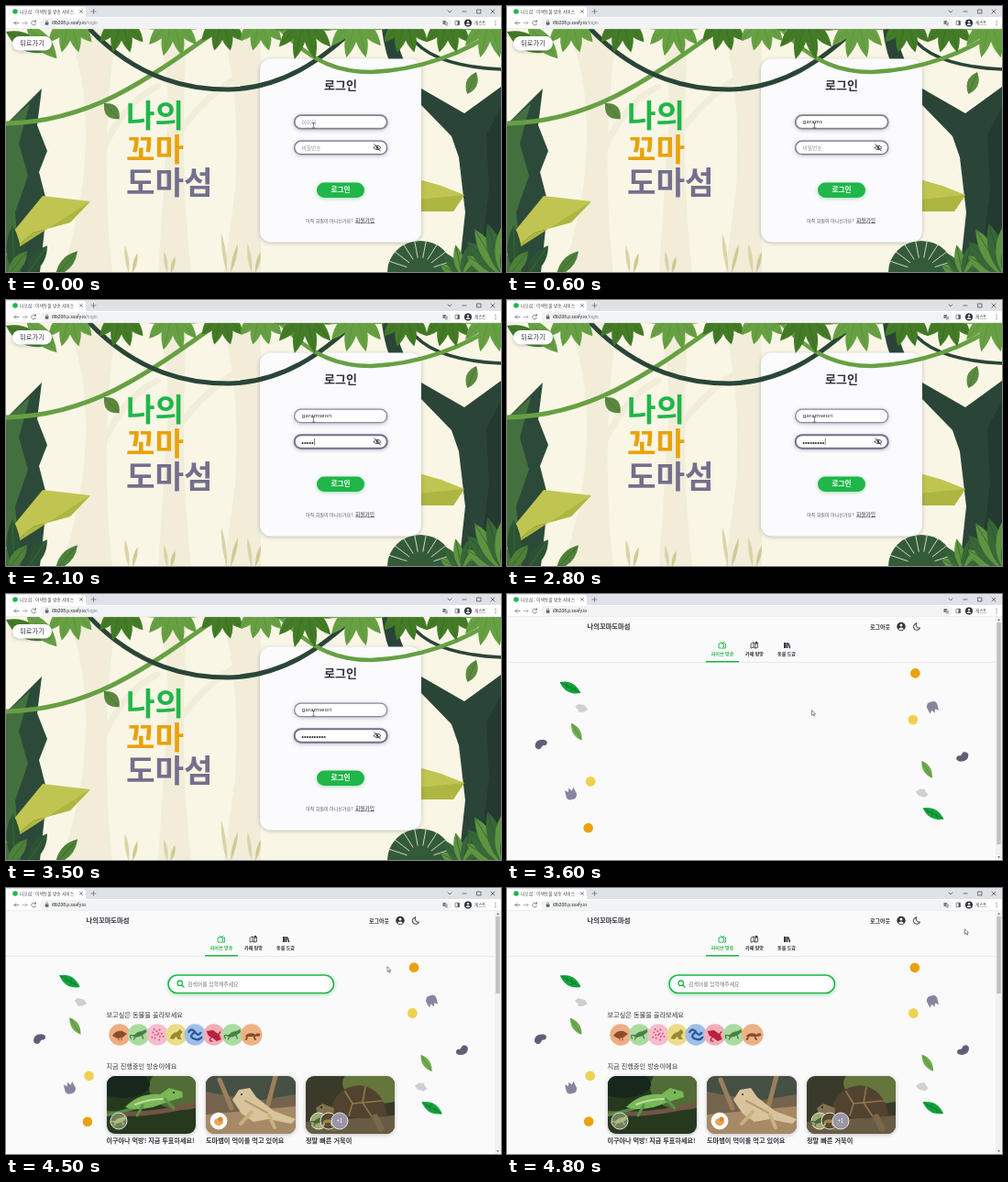
Recreate the animation shown at these times as an HTML page. Size 540 px wide and 290 px high, loop 4900 ms.

```html
<!DOCTYPE html>
<html lang="ko">
<head>
<meta charset="utf-8">
<title>나꼬섬</title>
<style>
html, body { margin: 0; width: 100%; height: 100%; overflow: hidden; background: #fff; }
svg { display: block; width: 540px; height: 290px; }
text { font-family: "Noto Sans CJK KR", "Noto Sans CJK", "Noto Sans", sans-serif; white-space: pre; }
.url { font-family: Roboto, "Open Sans", sans-serif; }
.latin { font-family: "Noto Sans", "Open Sans", sans-serif; }
.dots { font-family: "Liberation Sans", Arial, sans-serif; }
.lift { filter: drop-shadow(0 1px 2px rgba(60, 55, 80, .3)); }
.glow { filter: drop-shadow(0 1px 2px rgba(34, 179, 75, .4)); }
</style>
</head>
<body>
<svg id="stage" viewBox="0 0 540 290" xmlns="http://www.w3.org/2000/svg"></svg>
<script>
const LOOP = 4900, STEP = 100;
const GREEN = '#20b649', GOLD = '#e8a20c', PLUM = '#746f8d', INK = '#34323d';
const DARK = '#2a4538', LIGHT_LEAF = '#67a043', MID_LEAF = '#437b27';
const USER = 'garamseori';

const path = (d, fill) => `<path d="${d}" fill="${fill}"/>`;
const line = (d, color, w = 1, extra = '') =>
  `<path d="${d}" fill="none" stroke="${color}" stroke-width="${w}" stroke-linecap="round" stroke-linejoin="round" ${extra}/>`;
const dot = (x, y, r, fill, extra = '') => `<circle cx="${x}" cy="${y}" r="${r}" fill="${fill}" ${extra}/>`;
const oval = (x, y, rx, ry, fill) => `<ellipse cx="${x}" cy="${y}" rx="${rx}" ry="${ry}" fill="${fill}"/>`;
const box = (x, y, w, h, r, fill, extra = '') =>
  `<rect x="${x}" y="${y}" width="${w}" height="${h}" rx="${r}" fill="${fill}" ${extra}/>`;
const group = (content, attrs = '') => `<g ${attrs}>${content}</g>`;
const at = (x, y, content, more = '') => group(content, `transform="translate(${x} ${y}) ${more}"`);
// y is the middle of the line
const text = (x, y, size, str, fill = INK, weight = 400, extra = '') =>
  `<text x="${x}" y="${y + size * .36}" font-size="${size}" fill="${fill}" font-weight="${weight}" ${extra}>${str}</text>`;
const MID = 'text-anchor="middle"';

function leaf(x, y, len, wide, angle, fill, vein) {
  const h = len / 2;
  return at(x, y, path(`M0 0Q${h} ${-wide} ${len} 0Q${h} ${wide} 0 0Z`, fill) +
    (vein ? line(`M1 0H${len - 2}`, vein, .5) : ''), `rotate(${angle})`);
}
function fan(x, y, count, len, wide, from, to, colors, vein = '#24452e') {
  let s = '';
  for (let i = 0; i < count; i++) {
    const k = i / (count - 1);
    s += leaf(x, y, len * (.75 + .25 * Math.sin(Math.PI * k)), wide, from + (to - from) * k,
      colors[i % colors.length], vein);
  }
  return s;
}

function chrome() {
  const icon = '#5f6368';
  return box(0, 0, 540, 13, 0, '#dee1e6') +
    path('M0 13V1H84Q87 1 87 4V10Q87 13 90 13Z', '#fff') +
    dot(10, 6, 2.8, GREEN) +
    text(15, 6, 4.75, '나꼬섬 : 이색동물 방송 서비스', '#45484c') +
    line('M80.5 4.5L83.5 7.5M83.5 4.5L80.5 7.5', icon, .7) +
    line('M93 6H98M95.5 3.5V8.5', icon, .7) +
    line('M482 5L484 7L486 5M498 6H502M514 4H518V8H514ZM529 4L533 8M533 4L529 8', '#333', .65) +
    box(0, 12, 540, 13, 0, '#fff') +
    box(37, 13, 449, 11, 5.5, '#f1f3f4') +
    line('M14 18.5H9M11 16.5L9 18.5L11 20.5', icon, .7) +
    line('M18 18.5H23M21 16.5L23 18.5L21 20.5', '#9a9da1', .7) +
    line('M32.3 17A2.5 2.5 0 1 0 32.6 19.5M32.5 15.5V17.3H30.7', icon, .7) +
    box(42.8, 17.8, 3.6, 3, .5, icon) + line('M43.6 18V16.8A1 1 0 0 1 45.6 16.8V18', icon, .6) +
    text(50, 18.4, 4.9, 'i8b208.p.ssafy.io<tspan id="route" fill="#85898d">/login</tspan>', '#292b2e', 400, 'class="url"') +
    box(476.5, 16, 3.5, 4, .5, '#777b80') + box(478.8, 17.5, 3, 4, .4, '#a9adb2') +
    box(490, 16.2, 4.5, 4.5, .6, 'none', 'stroke="#555" stroke-width=".7"') + box(492.5, 16.2, 2, 4.5, 0, '#555') +
    dot(504, 18.5, 4, '#2d3136') + dot(504, 17.3, 1.2, '#dfe2e5') + path('M501.7 21A2.3 2 0 0 1 506.3 21Z', '#dfe2e5') +
    text(511, 18.4, 4.5, '게스트', '#333') +
    [16.3, 18.5, 20.7].map(y => dot(534, y, .6, icon)).join('') +
    box(0, 24.5, 540, .6, 0, '#dcdee0');
}

function jungle() {
  const pale = '#f1edd9', lime = '#c0c552', olive = '#adb641', sand = '#d9d3a6';
  let s = box(0, 25, 540, 265, 0, '#f9f6e6');
  s += path('M66 25C96 90 94 200 60 290H116C106 205 108 90 122 25Z', pale) +
    path('M164 25Q180 75 176 135L166 290H202Q188 170 198 25Z', pale) +
    path('M236 25Q256 100 250 200L238 290H278V25Z', pale) +
    line('M104 160Q128 105 165 88M180 150Q210 105 246 82', pale, 7);

  s += path('M0 129L39 90L34 130L45 158L36 181L45 216L37 290H0Z', '#2c4a39') +
    path('M0 129L26 106L14 150L24 185L10 225L16 290H0Z', '#44703f');
  // The limb passes behind the card and meets the trunk
  s += path('M410 25H424Q430 62 453 90L500 117L540 88V290H494L501 225L494 165L486 142L453 108Q416 80 410 25Z', DARK) +
    path('M540 110L524 140L527 200L516 290H540Z', '#24392f') +
    leaf(513, 72, 26, 12, 112, '#5b8a40', '#3c662c');

  s += path('M0 272L8 246L40 207L92 213L70 236L30 247Z', lime) + path('M0 272L92 213L70 236L30 247Z', olive);
  s += path('M440 186L475 196L500 206L488 224H440Z', lime) + path('M440 212L500 206L488 224H440Z', olive);

  for (const [x, h] of [[134, 30], [176, 24], [241, 44], [268, 32]]) {
    s += leaf(x, 291, h, 4, -98, sand) + leaf(x + 4, 291, h * .75, 4, -76, '#cfc993');
  }
  return s + leaf(9, 293, 54, 15, -92, '#2b5232', '#4c7a45') + leaf(22, 294, 40, 14, -55, '#2b5232', '#4c7a45') +
    leaf(2, 294, 34, 13, -52, '#4d8039', '#2b5232') + leaf(54, 294, 36, 12, -48, '#4d8039', '#2b5232');
}

function foreground() {
  const vine = '#67a043', leafy = ['#5d9440', '#376738'];
  const canopy = [[70, 40, LIGHT_LEAF], [126, 40, MID_LEAF], [236, 38, MID_LEAF], [182, 44, LIGHT_LEAF],
    [278, 38, LIGHT_LEAF], [326, 48, MID_LEAF], [436, 40, MID_LEAF], [382, 46, LIGHT_LEAF],
    [482, 40, MID_LEAF], [528, 46, LIGHT_LEAF]];
  let s = line('M437 25C450 54 490 67 542 69', DARK, 3.5) +
    line('M0 128C92 126 152 82 232 25', vine, 5) +
    line('M91 25C146 82 202 91 242 91C302 90 345 58 380 25', DARK, 5) +
    line('M299 25C336 64 366 72 398 72C450 70 500 52 538 25', vine, 4.5);
  s += leaf(0, 28, 48, 18, 28, MID_LEAF, '#2f6127') + leaf(22, 20, 50, 18, 48, LIGHT_LEAF, '#4d852e');
  for (const [x, len, color] of canopy)
    s += fan(x, 12, 6, len, 13, 158, 22, [color], color === MID_LEAF ? '#356820' : '#558d35');
  s += path('M416 290A36 34 0 0 1 488 290Z', '#345b39');
  for (let a = 200; a < 350; a += 20) {
    const c = Math.cos(a * Math.PI / 180), n = Math.sin(a * Math.PI / 180);
    s += line(`M${452 + c * 16} ${290 + n * 16}L${452 + c * 38} ${290 + n * 36}`, '#e6e5cc', .9);
  }
  return s + fan(498, 296, 6, 37, 11, -150, -30, leafy) +
    fan(543, 296, 6, 62, 17, -150, -78, leafy);
}

const field = (id, y) => box(314.7, y, 101, 14.5, 7.2, '#fff', `id="${id}" stroke="${PLUM}" class="lift"`);

function loginPage() {
  return jungle() +
    box(277, 57.5, 176, 200, 12, '#fbfafd', 'class="lift"') +
    foreground() +
    leaf(107, 106, 24, 14, 46, '#5b8740', '#3c662c') +
    box(7, 33, 43, 15.5, 7.7, '#fff', 'class="lift"') + text(28.5, 40.6, 7.3, '뒤로가기', INK, 500, MID) +
    text(131, 120, 34.3, '나의', GREEN, 700) + text(131, 156.5, 34.3, '꼬마', GOLD, 700) +
    text(131, 193, 34.3, '도마섬', PLUM, 700) +
    text(365, 86.5, 13, '로그인', INK, 700, MID) +
    field('idField', 119.2) + field('pwField', 147.2) +
    text(322.5, 126.5, 5.8, '아이디', '#9895a1', 400, 'id="idHint"') +
    text(322.5, 126.3, 6.1, '', '#2d2c33', 400, 'id="idText" class="latin"') +
    text(322.5, 154.5, 5.7, '비밀번호', '#9895a1', 400, 'id="pwHint"') +
    text(322.3, 154.8, 7.6, '', '#2d2c33', 400, 'id="pwText" class="dots"') +
    box(322, 151, .6, 7, 0, '#333', 'id="caret"') +
    line('M401 154.5Q405 149.8 409 154.5Q405 159 401 154.5M402 150.8L408.3 158', INK, .9) + dot(405, 154.5, 1.2, INK) +
    box(339, 192.5, 52, 16.5, 8.2, GREEN, 'class="glow"') + text(365, 200.7, 7.6, '로그인', '#fff', 700, MID) +
    text(327, 234, 5.05, '아직 회원이 아니신가요?', '#5d5a66') +
    text(381, 233.7, 5.7, '회원가입', INK, 500) + box(381, 236.6, 21, .5, 0, INK);
}

// Decorations of the left side; the right side is the same set turned half round
const debris = [
  [69, 102, leaf(-13, 0, 26, 10, 0, '#14a33d', '#08662a') +
    line('M-6 -2L-4 0M0 -3L2 0M5 -2L7 0M-4 2L-2 0M2 3L4 0', '#08662a', .5), 28],
  [81, 125, path('M-7 -2L-3 -5L4 -3L7 1L2 4L-3 4L-4 1Z', '#d0cfd5'), 0],
  [75.5, 150.5, leaf(-11, 0, 22, 8, 0, '#70ab50', '#457a30'), 57],
  [37, 164, path('M-7 2C-7 -4 -1 -6 4 -4C9 -2 6 3 3 2C0 1 0 5 -3 5Q-6 5 -7 2Z', '#625d76'), -12],
  [91, 204.5, dot(0, 0, 5.4, '#efd152'), 0],
  [70, 218, path('M-5 -6L-2 -3L0 -7L2 -3L5 -6L6 2Q4 7 0 6Q-6 6 -6 1Z', '#8a859e'), -20],
  [89, 254.7, dot(0, 0, 5.3, GOLD), 0]
];
const debrisSet = () => debris.map(([x, y, shape]) => at(x, y, group(shape, 'class="bit"'))).join('');

function header() {
  const tab = (x, str, color) => text(x, 65, 5.05, str, color, 700, MID);
  return text(87.5, 35.5, 7.3, '나의꼬마도마섬', INK, 700) +
    text(396, 35.6, 6, '로그아웃', INK, 700) +
    dot(430, 35.5, 4.7, INK) + dot(430, 34, 1.5, '#fff') + path('M427 38Q430 34.8 433 38Q430 40.5 427 38Z', '#fff') +
    line('M446.5 32A3.7 3.7 0 1 0 450.5 37A3.5 3.5 0 0 1 446.5 32Z', INK, 1) +
    line('M231.5 54H238.5V59H231.5ZM233 52L235 54L237 52M236.5 55V58', GREEN, .9) +
    line('M266.5 54L269 53L271 54.5L273.5 53.5V58.5L271 59L269 58L266.5 59ZM269 53V58M271 55V59', INK, .8) +
    dot(272, 53, 1.3, INK) +
    box(302, 53, 2, 6, 0, INK) + box(304.5, 53, 1.8, 6, 0, INK) + line('M307 54L308.5 58.5', INK, 1.5) +
    tab(235, '라이브 방송', GREEN) + tab(270, '카페 탐방', INK) + tab(305, '동물 도감', INK) +
    box(0, 74, 533, .6, 0, '#dedee2') + box(217, 73, 36, 1.5, 0, GREEN);
}

const lizard = (color, belly = color) =>
  line('M-8 4Q-11 -1 -5 1L4 -2M-3 1L-5 5M3 -1L5 4', color, 1.4) +
  path('M-6 2Q-2 -4 4 -4L8 -6L9 -3L5 0Q-1 4 -6 2Z', color) + line('M-3 1L5 -2', belly, .7);
const turtle = (shell, skin) =>
  path('M-7 2A7 6 0 0 1 6 2Z', shell) + oval(7, 0, 2.5, 1.8, skin) + line('M-5 3L-6 5M3 3L4 5', skin, 2);

function animals() {
  const bird = path('M-8 1Q-4 -5 3 -4L8 -1L3 3L-3 4Z', '#8c4d29') + line('M-1 3V6M2 3V6', '#8c4d29', 1);
  const gecko = [...Array(13)].map((_, i) =>
    dot((7 * Math.sin(i * 2.4) * Math.sqrt(i / 12)).toFixed(1), (7 * Math.cos(i * 2.4) * Math.sqrt(i / 12)).toFixed(1), 1, '#d55a82')).join('');
  const frog = path('M-7 4Q-5 -2 1 -3L4 -6L7 -3L4 1L6 5H2L0 2L-3 5Z', '#9a8a2f');
  const snake = line('M-7 -3Q-4 -8 0 -3Q3 2 6 -2M0 -3Q-7 1 -2 4Q4 7 7 3', '#285b9a', 2.3);
  const chameleon = path('M-8 -4L-1 -5L6 0L8 5L3 7L-2 3L-6 1Z', '#b9213e') + line('M-2 2Q-7 7 -2 7M3 2L7 -3', '#b9213e', 1.4);
  const list = [['#efad83', bird], ['#a9dca1', lizard('#4b8045')], ['#f5bdcd', gecko], ['#ecdb88', frog],
    ['#9ebfe9', snake], ['#f2aeb8', chameleon], ['#a9dca1', lizard('#4b8045')], ['#efb083', turtle('#80502f', '#80502f')]];
  return list.map(([bg, shape], i) => at(124 + i * 20.55, 160, dot(0, 0, 11.7, bg) + shape)).join('');
}

function photos() {
  const iguana = box(0, 0, 97, 63, 0, '#26391f') + oval(82, 12, 36, 25, '#536b36') + oval(17, 9, 30, 15, '#17271c') +
    line('M-2 40Q45 45 99 30', '#735444', 5) + line('M-2 43Q42 33 61 25', '#519044', 3.5) +
    path('M20 34Q35 18 58 20L68 13L82 17L83 23L70 27L50 34Q31 38 20 34Z', '#78b858') +
    line('M39 32L33 43M63 25L73 35', '#559448', 3) + line('M31 31Q46 25 61 25', '#c9d8a1', 2) + dot(73, 18, 1, '#202919');
  const dragon = box(0, 0, 98, 63, 0, '#74644d') + path('M0 0H98V20L55 27L0 17Z', '#455043') +
    path('M0 42L98 33V63H0Z', '#a58a65') + line('M15 4L28 35M76 0L66 38', '#9b7f5b', 5) +
    path('M29 26L36 15L48 13L55 23L74 38L98 47L93 52L68 47L52 50L39 41Z', '#d8c49c') +
    line('M50 39L38 52M69 43L75 56', '#c9b184', 4) + line('M43 27L67 40', '#b69c70', 2) + dot(39, 20, 1.1, '#3c3327');
  const tortoise = box(0, 0, 97, 63, 0, '#393a29') + oval(80, 8, 40, 22, '#65763d') + path('M0 50L97 43V63H0Z', '#675c43') +
    path('M27 39Q31 12 59 10Q84 13 89 43Q57 51 27 39Z', '#514330') +
    line('M43 17L51 30L47 43M65 12L62 29L72 44M51 30L62 29M83 27L62 29', '#94764d', 1.6) +
    path('M31 35L18 30L11 35L13 42L30 43Z', '#82724f') + line('M38 44L31 57M76 45L82 57', '#79684a', 7) + dot(17, 34, 1, '#1f2119');
  return [[110, 97, iguana], [218, 98, dragon], [327, 97, tortoise]].map(([x, w, art], i) =>
    `<clipPath id="pic${i}"><rect width="${w}" height="63" rx="9"/></clipPath>` +
    group(at(x, 205, group(art, `clip-path="url(#pic${i})"`)), 'class="lift"')).join('');
}

function content() {
  const face = (x, bg, shape) => at(x, 254, dot(0, 0, 9, bg, 'stroke="#fff" stroke-width=".8"') + shape);
  return box(177, 95, 180.5, 19.5, 9.7, '#fff', `stroke="${GREEN}" stroke-width="1.6" class="glow"`) +
    dot(189.7, 103.7, 2.7, 'none', `stroke="${GREEN}" stroke-width="1.3"`) + line('M191.8 105.8L194 108', GREEN, 1.4) +
    text(198, 104.8, 5.85, '검색어를 입력해주세요', '#77747f') +
    text(109.5, 138, 7.2, '보고싶은 동물을 골라보세요', INK) + animals() +
    text(109.5, 194.5, 7.2, '지금 진행중인 방송이에요', INK) + photos() +
    face(123, '#71805c', lizard('#a9bc82')) + face(232, '#fff', oval(0, 1, 5, 4, '#e8a45b') + dot(2, -2, 2.5, '#d68433')) +
    face(341, '#a0aa74', lizard('#4e6337')) + face(352, '#574b31', turtle('#a28444', '#c1ad69')) +
    face(364, '#9995a6', text(0, 0, 6, '+1', '#fff', 500, MID)) +
    text(109.5, 275.5, 7.1, '이구아나 먹방! 지금 투표하세요!', INK, 700) +
    text(218, 275.5, 7.2, '도마뱀이 먹이를 먹고 있어요', INK, 700) +
    text(327, 275.5, 7.2, '정말 빠른 거북이', INK, 700);
}

const homePage = () => box(0, 25, 540, 265, 0, '#fafafa') +
  debrisSet() + group(debrisSet(), 'transform="rotate(180 267 170.7)"') + header() +
  group(content(), 'id="content"') +
  box(533, 25, 7, 265, 0, '#f1f1f1') + box(534.3, 31, 4.5, 242, 0, '#c1c1c1', 'id="thumb"') +
  path('M535 29L536.6 27L538.2 29Z', '#777') + path('M535 286L536.6 288L538.2 286Z', '#777');

const $ = id => document.getElementById(id);
$('stage').innerHTML = group(loginPage(), 'id="login"') + group(homePage(), 'id="home"') + chrome() +
  line('M334 127.5H337M335.5 127.5V133M334 133H337', '#444', .6, 'id="beam"') +
  group('<path d="M0 0V5.6L1.4 4.4L2.3 6.5L3.2 6.1L2.3 4.1H4Z" fill="#fff" stroke="#333" stroke-width=".55"/>', 'id="arrow"');

const bits = [...document.querySelectorAll('.bit')];
const show = (id, on) => { $(id).style.display = on ? '' : 'none'; };
const clamp = (v, lo, hi) => Math.min(hi, Math.max(lo, v));
const typed = (t, start, gap) => clamp(Math.floor((t - start) / gap) + 1, 0, 10);

const FOCUS_PW = 1100, PW_START = 1300, PW_GAP = 175;

function draw(t) {
  const login = t < 3600, loaded = t >= 3800, onPw = t >= FOCUS_PW;
  show('login', login); show('home', !login);
  show('route', login); show('beam', login); show('arrow', !login);

  if (login) {
    const name = typed(t, 100, 100), dots = typed(t, PW_START, PW_GAP);
    $('idText').textContent = USER.slice(0, name);
    $('pwText').textContent = '•'.repeat(dots);
    show('idHint', !name); show('pwHint', !dots);
    $('idField').setAttribute('stroke-width', onPw ? 1.3 : 1.8);
    $('idField').setAttribute('stroke', onPw ? '#8d8a99' : '#85818f');
    $('pwField').setAttribute('stroke-width', onPw ? 2 : 1.3);
    // The caret blinks from the latest key press
    const lastKey = dots ? PW_START + (dots - 1) * PW_GAP : FOCUS_PW;
    show('caret', onPw && (t - lastKey) % 1000 < 500);
    $('caret').setAttribute('x', 322 + dots * 2.66 + (dots ? .9 : 0));
    return;
  }
  show('content', loaded);
  $('thumb').setAttribute('height', loaded ? 84 : 242);
  bits.forEach((bit, i) => {
    const n = i % debris.length, wave = Math.sin((t - 3600) / 480 + n * .7);
    bit.setAttribute('transform', `translate(${(wave * .4).toFixed(2)} ${(-wave * .4).toFixed(2)}) rotate(${debris[n][3] + wave * 2})`);
  });
  const k = clamp((t - 4200) / 600, 0, 1), ease = k * k * (3 - 2 * k);
  $('arrow').setAttribute('transform', `translate(${332.5 + 167 * ease} ${126.7 - 82 * ease})`);
}

const begin = performance.now();
function tick() {
  const t = (performance.now() - begin) % LOOP;
  draw(Math.floor(t / STEP) * STEP);
  requestAnimationFrame(tick);
}
tick();
</script>
</body>
</html>
```
